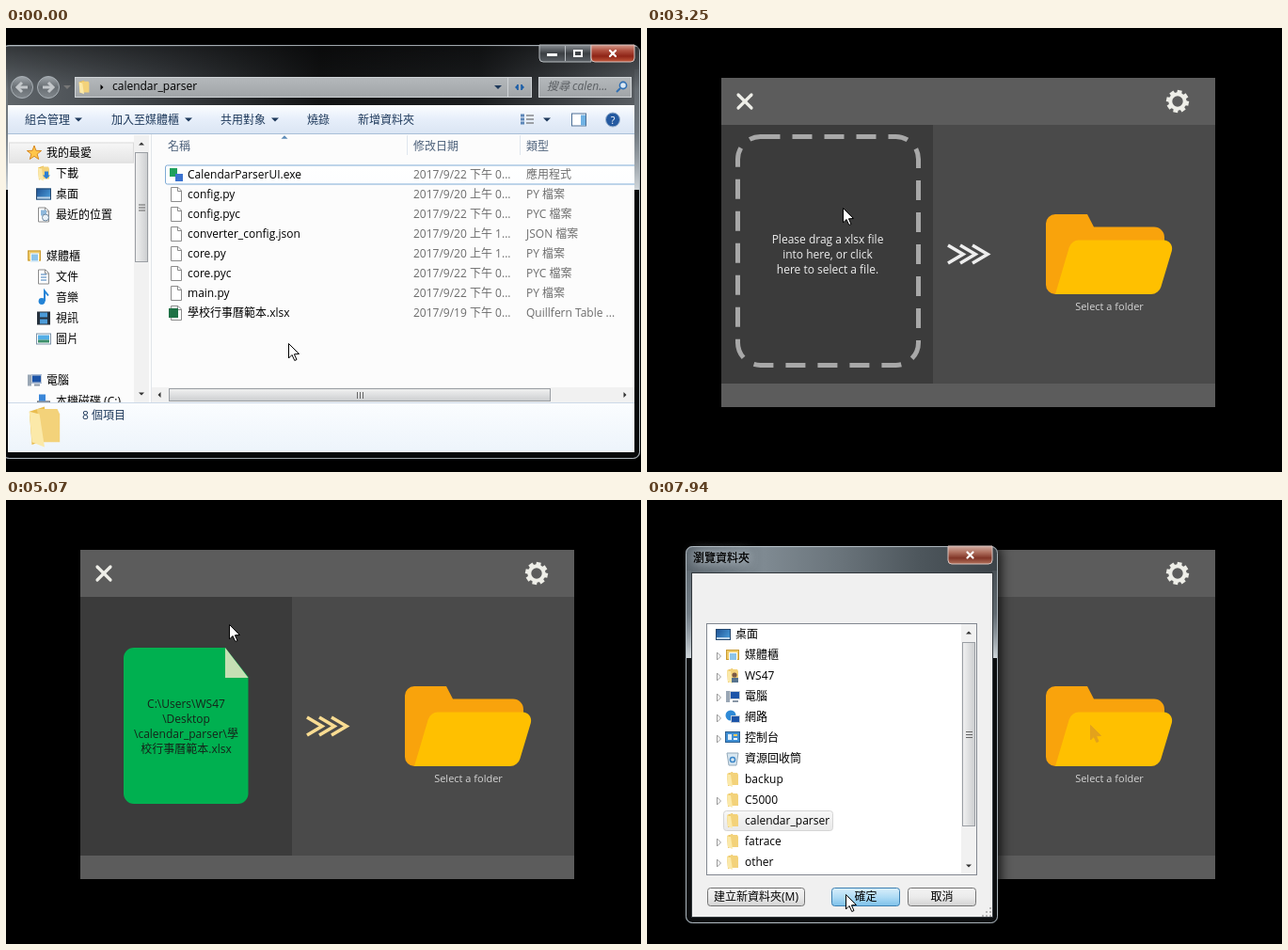
Write an HTML page with a canvas that moves like this. It is 675 px wide and 472 px high and loops after 8 s.

```html
<!DOCTYPE html>
<html lang="zh-Hant">
<head>
<meta charset="utf-8">
<style>
html, body { margin: 0; width: 100%; height: 100%; overflow: hidden; background: #000; }
canvas { display: block; }
</style>
</head>
<body>
<canvas id="stage" width="675" height="472"></canvas>
<script>
const W = 675, H = 472, LOOP = 8000;
const screen2d = document.getElementById('stage').getContext('2d');
const buffer = Object.assign(document.createElement('canvas'), { width: W, height: H }).getContext('2d');
let g = screen2d;

// ---- drawing helpers ----
function grad(x0, y0, x1, y1, ...colors) {
  const fill = g.createLinearGradient(x0, y0, x1, y1);
  colors.forEach((c, i) => fill.addColorStop(i / (colors.length - 1), c));
  return fill;
}
function paint(fill, line, width = 1) {
  if (fill) { g.fillStyle = fill; g.fill(); }
  if (line) { g.strokeStyle = line; g.lineWidth = width; g.stroke(); }
}
function box(x, y, w, h, fill, line) {
  if (fill) { g.fillStyle = fill; g.fillRect(x, y, w, h); }
  if (line) { g.strokeStyle = line; g.lineWidth = 1; g.strokeRect(x + .5, y + .5, w - 1, h - 1); }
}
function round(x, y, w, h, r, fill, line, width) {
  g.beginPath(); g.roundRect(x, y, w, h, r); paint(fill, line, width);
}
function circle(x, y, r, fill, line, width) {
  g.beginPath(); g.arc(x, y, r, 0, 7); paint(fill, line, width);
}
function poly(p, fill, line, width, open) {
  g.beginPath();
  for (let i = 0; i < p.length; i += 2) g.lineTo(p[i], p[i + 1]);
  if (!open) g.closePath();
  paint(fill, line, width);
}
const stroke = (p, color, width) => poly(p, null, color, width, true);
function text(s, x, y, color = '#000', { size = 12, align = 'left', style = '' } = {}) {
  g.font = `${style} ${size}px "Open Sans", "Noto Sans CJK TC", "Noto Sans CJK JP", sans-serif`;
  g.textAlign = align;
  g.fillStyle = color;
  g.fillText(s, x, y + 4.3);
}
function arrow(x, y, dx, dy, size = 4, color = '#333') {
  const k = size / 2;
  poly([x + dx * k, y + dy * k, x - dx * k + dy * size, y - dy * k + dx * size,
        x - dx * k - dy * size, y - dy * k - dx * size], color);
}
const down = (x, y, color = '#1e395b') => arrow(x, y, 0, 1, 4, color);
function cross(x, y, r, color, width) {
  g.lineCap = 'round';
  stroke([x - r, y - r, x + r, y + r], color, width);
  stroke([x + r, y - r, x - r, y + r], color, width);
  g.lineCap = 'butt';
}

// ---- icons, each on a 16 px grid ----
const sheetOfPaper = () => {
  poly([2.5, .5, 10, .5, 13.5, 4, 13.5, 15.5, 2.5, 15.5], '#fff', '#8c8c8c');
  stroke([9.5, .5, 9.5, 4.5, 13.5, 4.5], '#8c8c8c');
};
const icons = {
  folder() {
    poly([2, 2, 8, 0, 9, 13, 3, 15], '#e9bd4f');
    poly([5, 1, 13, 1, 14, 3, 14, 14, 7, 14], '#f3d27a');
    poly([2, 2, 6, 3, 8, 16, 3, 14], '#fbe9a9');
  },
  page: sheetOfPaper,
  sheet() { sheetOfPaper(); box(0, 3, 10, 10, '#1e7145'); },
  app() { box(1, 1, 8, 9, '#1fa15c'); box(7, 7, 8, 8, '#3b73d0'); },
  star() {
    const p = [];
    for (let i = 0; i < 10; i++) {
      const r = i % 2 ? 3.3 : 8, a = i * Math.PI / 5;
      p.push(8 + r * Math.sin(a), 8.5 - r * Math.cos(a));
    }
    poly(p, '#ffc64a', '#d98a22');
  },
  download() { icons.folder(); box(9, 6, 4, 5, '#2a7fd4'); arrow(11, 12, 0, 1, 4, '#2a7fd4'); },
  desktop() { box(0, 2, 16, 12, grad(0, 2, 16, 14, '#1d4f91', '#4da3e0'), '#25486f'); box(1, 11, 14, 2, '#bdd5ea'); },
  recent() { sheetOfPaper(); box(5, 3, 6, 6, '#8fb9dd'); circle(10, 11, 3.5, '#e8f1f8', '#6d87a0'); },
  library() { box(1, 2, 14, 11, '#f0cc6a', '#c99b34'); box(4, 5, 9, 9, '#8cc4ea', '#fff'); },
  document() { sheetOfPaper(); for (const y of [5, 8, 11]) box(5, y, 6, 1, '#3d7ab8'); },
  music() { circle(6, 12, 3.4, '#2383d6'); stroke([9, 12, 9, 1, 13, 6], '#2383d6', 2); },
  video() { box(1, 1, 14, 14, '#26313d'); box(4, 2, 8, 5, '#4c9bd8'); box(4, 9, 8, 5, '#4c9bd8'); },
  picture() { box(0, 2, 16, 12, '#fff', '#7c93a8'); box(2, 4, 12, 5, '#54aee6'); box(2, 9, 12, 3, '#3b8f6a'); },
  computer() { box(1, 2, 4, 12, '#9aa7b5'); box(5, 2, 11, 9, '#1c54a8', '#c4ccd6'); box(8, 12, 6, 2, '#8996a5'); },
  drive() { box(1, 8, 14, 6, '#a9b1ba', '#6d757e'); box(3, 1, 7, 7, '#3a86d8'); },
  user() { icons.folder(); circle(10, 7, 2.6, '#7b5a44'); box(7, 10, 7, 5, '#56738e'); },
  network() { circle(6, 6, 5.5, '#2f8ad6'); box(6, 6, 10, 8, '#1c54a8', '#c4ccd6'); },
  control() { box(0, 1, 16, 12, '#3f8fd4', '#2a5f92'); box(3, 4, 4, 6, '#dfeefa'); box(9, 4, 4, 2, '#f0c95c'); box(9, 8, 4, 2, '#fff'); },
  bin() { poly([2, 2, 14, 2, 12, 15, 4, 15], '#d8e7f1', '#93a9ba'); circle(8, 9, 2.6, null, '#3b86c8', 1.5); }
};
function icon(name, x, y, scale = 1) {
  g.save();
  g.translate(x, y); g.scale(scale, scale); g.translate(-8, -8);
  icons[name]();
  g.restore();
}

// ---- window parts ----
// tones run along the title bar; edge colours the frame below the reflection.
function glass(x, y, w, h, shine, tones, edge) {
  g.save();
  g.shadowColor = 'rgba(0,0,0,.8)'; g.shadowBlur = 12; g.shadowOffsetX = 3;
  round(x, y, w, h, 7, grad(x, 0, x + w, 0, ...tones));
  g.restore();
  const side = g.createLinearGradient(0, y, 0, y + h), stop = shine / h;
  side.addColorStop(0, 'rgba(160,172,182,0)');
  side.addColorStop(stop * .6, 'rgba(160,172,182,.35)');
  side.addColorStop(stop, '#d0d6da');
  side.addColorStop(stop, edge);
  side.addColorStop(1, edge);
  box(x + 1, y + 26, 5, h - 32, side);
  box(x + w - 6, y + 26, 5, h - 32, side);
  round(x + 1, y + h - 8, w - 2, 7, [0, 0, 6, 6], edge);
  round(x + .5, y + .5, w - 1, h - 1, 7, null, 'rgba(205,214,220,.75)');
}
function closeButton(x, y, w, h, ...tones) {
  round(x, y, w, h, [0, 0, 4, 4], grad(0, y, 0, y + h, ...tones), '#d8c4c0');
  cross(x + w / 2, y + h / 2, 3, '#fff', 2.2);
}
const dialogClose = (x, y) => closeButton(x, y, 47, 19, '#d0aca2', '#b27362', '#813527', '#b0705a');
function captionText(s, x, y) {
  g.save(); g.shadowColor = '#c8d2da'; g.shadowBlur = 12;
  text(s, x, y); text(s, x, y);
  g.restore();
}
function scrollBar(x, y, length, from, to, vertical) {
  const bar = (a, b, s, t, ...rest) => vertical ? box(x + b, y + a, t, s, ...rest) : box(x + a, y + b, s, t, ...rest);
  bar(0, 0, length, 16, '#f1f1f1');
  bar(from, 1, to - from, 14, vertical ? grad(x, 0, x + 16, 0, '#f5f5f5', '#c8cacc') : grad(0, y, 0, y + 16, '#f5f5f5', '#c8cacc'), '#9a9ea3');
  for (let i = -3; i <= 3; i += 3) bar((from + to) / 2 + i, 5, 1, 7, '#666');
  if (vertical) { arrow(x + 8, y + 9, 0, -1, 3); arrow(x + 8, y + length - 9, 0, 1, 3); }
  else { arrow(x + 8, y + 8, -1, 0, 3); arrow(x + length - 10, y + 8, 1, 0, 3); }
}
function button(x, y, w, h, label, look = 'plain') {
  const hot = look === 'hot';
  round(x + .5, y + .5, w - 1, h - 1, 3,
    grad(0, y, 0, y + h, ...(hot ? ['#dcf0fb', '#b0dcf5', '#7abfe9'] : ['#f4f4f4', '#ebebeb', '#d2d2d2'])),
    hot ? '#3c7fb1' : look === 'default' ? '#2f9cc9' : '#737373', look === 'default' ? 2 : 1);
  text(label, x + w / 2, y + h / 2, '#000', { align: 'center' });
}
function navBar(dx, dy, addressEnd, searchX, query, ...field) {
  g.save(); g.translate(dx, dy);
  for (const x of [17, 45]) {
    circle(x, 63, 11.5, grad(0, 51, 0, 75, '#a2a8ad', '#686e73', '#82888d'), '#a9b0b6');
    const d = x < 30 ? -1 : 1;
    stroke([x - 6 * d, 63, x + 5 * d, 63], '#c3c7ca', 3);
    stroke([x, 58, x + 5 * d, 63, x, 68], '#c3c7ca', 3);
  }
  down(65, 63, '#777');
  const fill = grad(0, 52, 0, 75, ...field), end = addressEnd - dx;
  box(73, 52, end - 73, 22, fill, '#d0d4d7');
  icon('folder', 83, 63, .9);
  arrow(102, 63, 1, 0, 3, '#000');
  text('calendar_parser', 113, 62);
  down(end - 36, 63);
  box(end - 26, 53, 1, 20, '#d0d4d7');
  const rx = end - 13;
  stroke([rx - 2, 66, rx - 2, 60], '#1d5fa8', 1.6); arrow(rx - 3.5, 63, -1, 0, 3, '#1d5fa8');
  stroke([rx + 2, 60, rx + 2, 66], '#1d5fa8', 1.6); arrow(rx + 3.5, 63, 1, 0, 3, '#1d5fa8');
  g.translate(-dx, 0);
  box(searchX, 52, 665 - searchX, 22, fill, '#d0d4d7');
  text(query, searchX + 9, 62, '#5a5e62', { style: 'italic' });
  circle(656, 61, 3.6, '#dce9f4', '#2f6fb3', 1.6); stroke([653, 64, 649, 68], '#2f6fb3', 2);
  g.restore();
}
function toolbar(x, y, w, h, items) {
  box(x, y, w, h, grad(0, y, 0, y + h, '#fbfdff', '#e6eefa', '#dae5f3'));
  box(x, y + h - 1, w, 1, '#a9bfd8');
  const mid = y + h / 2;
  for (const [label, at, more] of items) {
    text(label, at, mid, '#1e395b');
    if (more) down(more, mid);
  }
  for (let i = 0; i < 3; i++) {
    box(547, mid - 6 + i * 4, 4, 3, '#5c86b8');
    box(553, mid - 5 + i * 4, 8, 1, '#555');
  }
  down(575, mid);
  box(601, mid - 7, 16, 14, '#fff', '#4c6f96'); box(611, mid - 5, 5, 11, '#6fb2e4');
  circle(645, mid, 7.5, '#2459a0', '#9db4d0');
  text('?', 645, mid, '#fff', { size: 11, align: 'center' });
}
const places = [
  [0, 'star', '我的最愛'], [1, 'download', '下載'], [2, 'desktop', '桌面'], [3, 'recent', '最近的位置'],
  [5, 'library', '媒體櫃'], [6, 'document', '文件'], [7, 'music', '音樂'], [8, 'video', '視訊'], [9, 'picture', '圖片'],
  [11, 'computer', '電腦'], [12, 'drive', '本機磁碟 (C:)']
];
function sidebar(x, y, step) {
  box(x + 1, y - 11, 133, 22, grad(0, y - 11, 0, y + 11, '#f7f7f7', '#e4e4e4'), '#dcdcdc');
  for (const [row, name, label] of places) {
    const indent = row % 5 && row !== 11 ? 10 : 0;
    icon(name, x + 28 + indent, y + row * step);
    text(label, x + 41 + indent, y + row * step);
  }
}
function listHeader(y, name, date, type) {
  for (const [label, x] of [['名稱', name], ['修改日期', date], ['類型', type]]) {
    text(label, x, y, '#4c607a');
    if (x > name) box(x - 7, y - 12, 1, 21, '#dfe6ee');
  }
}
const files = [
  ['app', 'CalendarParserUI.exe', '22 下午 0', '應用程式'], ['page', 'config.py', '20 上午 0', 'PY 檔案'],
  ['page', 'config.pyc', '22 下午 0', 'PYC 檔案'], ['page', 'converter_config.json', '20 上午 1', 'JSON 檔案'],
  ['page', 'core.py', '20 上午 1', 'PY 檔案'], ['page', 'core.pyc', '22 下午 0', 'PYC 檔案'],
  ['page', 'main.py', '22 下午 0', 'PY 檔案'], ['sheet', '學校行事曆範本.xlsx', '19 下午 0', 'Quillfern Table ...']
];
function fileRow([kind, name, day, type], y, x, dateX, typeX) {
  icon(kind, x - 12, y);
  text(name, x, y);
  text(`2017/9/${day}...`, dateX, y, '#6d6d6d');
  text(type, typeX, y, '#6d6d6d');
}
function rowHighlight(x, y, w, look) {
  const [top, bottom, line] = {
    focus: ['#fff', '#fdfeff', '#7fabd6'], hover: ['#fafcff', '#ebf4fd', '#b8d6fb'],
    chosen: ['#e3effd', '#c8defb', '#7da2ce'], idle: ['#f8f8f8', '#e5e5e5', '#d9d9d9']
  }[look];
  round(x + .5, y - 10, w, 20, 2, grad(0, y - 10, 0, y + 10, top, bottom), line);
}

// ---- windows ----
function explorer(t) {
  glass(-4, 18, 678, 440, 154, ['#60666b', '#3a3e42', '#121314', '#1b1d1f', '#5a5f64'], '#08090a');
  box(-3, 20, 676, 45, grad(0, 20, 0, 65, 'rgba(0,0,0,.45)', 'rgba(0,0,0,0)'));
  round(567, 18, 55, 18, [0, 0, 0, 4], grad(0, 18, 0, 36, '#8a8f94', '#3b3f43', '#5a5f64'), '#b8bdc1');
  if (t > 1640) {
    g.save(); g.shadowColor = '#5cd8ff'; g.shadowBlur = 14;
    box(568, 19, 26, 16, grad(0, 19, 0, 35, '#a6d8ee', '#2d7fa8', '#6ed4f4'));
    g.restore();
  }
  box(594, 19, 1, 16, '#b8bdc1');
  box(575, 27, 11, 3, '#fff');
  g.strokeStyle = '#fff'; g.lineWidth = 2; g.strokeRect(604, 24, 8, 6);
  closeButton(622, 18, 46, 18, '#d49a8c', '#b0503f', '#8e2416', '#c2583c');
  navBar(0, 0, 559, 566, '搜尋 calen...', '#b5b9bc', '#9fa3a6');

  box(2, 82, 666, 369, '#fcfcfc');
  const ready = t >= 780;
  toolbar(2, 82, 666, 31, [['組合管理', 20, 77],
    ...(ready ? [['開啟', 132, 169], ['共用對象', 204, 262], ['燒錄', 296], ['新增資料夾', 350]]
      : [['加入至媒體櫃', 112, 194], ['共用對象', 228, 286], ['燒錄', 320], ['新增資料夾', 374]])]);
  if (ready) { box(113, 90, 14, 14, '#fff', '#34465c'); box(113, 90, 14, 3, '#34465c'); box(116, 96, 8, 5, '#5c86b8'); }

  g.save();
  g.beginPath(); g.rect(2, 113, 666, 286); g.clip();
  sidebar(2, 132.5, 22);
  scrollBar(136, 114, 284, 18, 135, true);
  box(154, 113, 1, 285, '#e2e6ea');
  listHeader(126, 172, 433, 553);
  arrow(296, 116, 0, -1, 3.5, '#5f8cb8');
  rowHighlight(169, 156, 520, t < 330 ? 'focus' : t < 610 ? 'hover' : t < 1100 ? 'chosen' : 'idle');
  files.forEach((file, i) => fileRow(file, 156 + 21 * i, 193, 433, 553));
  scrollBar(155, 382, 513, 18, 424, false);
  g.restore();

  box(2, 398, 666, 53, grad(0, 398, 0, 451, '#fbfdff', '#edf4fb'));
  box(2, 398, 666, 1, '#ccd9e8');
  if (t < 610) {
    icon('folder', 41, 424, 2.7);
    text('8 個項目', 81, 412, '#1e395b');
    return;
  }
  box(22, 405, 22, 27, '#1fa15c');
  box(41, 424, 22, 21, '#3b73d0');
  const label = '#5a6b85', value = '#1e395b';
  text('CalendarParserUI.exe', 79, 412, '#000', { size: 12.6 });
  text('應用程式', 79, 431, label);
  text('修改日期:', 214, 412, label); text('2017/9/22 下午 03:32', 270, 412, value);
  text('建立日期:', 407, 412, label); text('2017/9/22 下午 05:38', 463, 412, value);
  text('大小:', 238, 431, label); text('1.09 MB', 270, 431, value);
}

function openDialog(t) {
  const chosen = t >= 4620;
  glass(5, 0, 664, 468, 163, ['#35424e', '#4b5a68', '#7b8995', '#5d6b77', '#44515d'], '#2d3944');
  icon('app', 18, 13, .9);
  captionText('開啟舊檔', 32, 14);
  dialogClose(621, 0);
  navBar(7, -18, 461, 467, '搜尋 calendar_parser', '#b3bdc6', '#9ba6b0');
  box(11, 65, 652, 398, '#fff');
  toolbar(11, 65, 652, 29, [['組合管理', 28, 85], ['新增資料夾', 119]]);
  sidebar(10, 113, 21.7);
  scrollBar(149, 94, 292, 18, 157, true);
  box(167, 94, 1, 291, '#e2e6ea');
  listHeader(106, 185, 442, 560);
  arrow(306, 97, 0, -1, 3.5, '#5f8cb8');
  if (t >= 4350) rowHighlight(181, 136, 480, chosen ? 'chosen' : 'hover');
  fileRow(files[7], 136, 206, 441, 560);
  scrollBar(168, 369, 495, 19, 405, false);
  box(11, 386, 652, 77, '#f0f0f0');
  text('檔案名稱(N):', 207, 407, '#000', { align: 'right' });
  box(212, 396, 223, 22, '#fff', '#8fa5b8');
  if (chosen) text('學校行事曆範本.xlsx', 216, 407);
  else box(217, 400, 1, 14, '#000');
  down(426, 407, '#000');
  button(447, 396, 202, 22, '');
  text('Table file(*.xlsx)', 451, 407);
  down(640, 407, '#000');
  button(448, 425, 102, 25, '', 'default');
  text('開啟舊檔(O)', 491, 437, '#000', { align: 'center' });
  box(535, 427, 1, 21, '#8a8a8a');
  down(542, 438, '#000');
  button(563, 425, 84, 25, '取消');
}

const tree = [
  ['desktop', '桌面'], ['library', '媒體櫃', 1], ['user', 'WS47', 1], ['computer', '電腦', 1], ['network', '網路', 1],
  ['control', '控制台', 1], ['bin', '資源回收筒'], ['folder', 'backup'], ['folder', 'C5000', 1],
  ['folder', 'calendar_parser'], ['folder', 'fatrace', 1], ['folder', 'other', 1]
];
function browseDialog(t) {
  glass(41, 49, 332, 401, 119, ['#59636b', '#7f8a92', '#69737a', '#4d565c', '#3c4348'], '#0b0d0f');
  captionText('瀏覽資料夾', 49, 62);
  dialogClose(320, 49);
  box(47, 77, 321, 367, '#f0f0f0', '#30363b');
  box(63, 131, 288, 268, '#fff', '#828790');
  if (t >= 7600) round(81.5, 330.5, 116, 21, 3, grad(0, 330, 0, 352, '#f8f8f8', '#e8e8e8'), '#d5d5d5');
  tree.forEach(([kind, label, expands], i) => {
    const x = i ? 91 : 81, y = 143 + 22 * i;
    icon(kind, x, y);
    text(label, x + 13, y);
    if (expands && t >= 7400) {
      g.globalAlpha = Math.min(1, (t - 7390) / 200);
      poly([74.5, y - 3, 78.5, y + 1, 74.5, y + 5], '#fff', '#999');
      g.globalAlpha = 1;
    }
  });
  scrollBar(334, 132, 266, 19, 215, true);
  button(64, 412, 104, 20, '建立新資料夾(M)');
  button(196, 412, 73, 20, '確定', t >= 7860 ? 'hot' : 'default');
  button(277, 412, 73, 20, '取消');
  for (let i = 0; i < 3; i++) for (let j = 0; j <= i; j++) box(364 - 4 * j, 433 + 4 * i, 2, 2, '#b5b5b5');
}

function converter(hover, loaded) {
  box(79, 53, 525, 350, '#5c5c5c');
  box(79, 103, 525, 275, '#4a4a4a');
  if (hover === 'left') box(79, 103, 225, 275, '#3b3b3b');
  if (hover === 'right') box(304, 103, 300, 275, '#3b3b3b');
  cross(104, 78, 7, '#eeeee8', 3.2);
  for (let i = 0; i < 8; i++) {
    g.save(); g.translate(564, 78); g.rotate(i * Math.PI / 4 + .2);
    box(-2.5, -12, 5, 5, '#eeeee8');
    g.restore();
  }
  circle(564, 78, 7.7, null, '#eeeee8', 4);

  const centered = { align: 'center' };
  if (loaded) {
    g.beginPath();
    g.moveTo(233, 157); g.lineTo(257.5, 188);
    g.arcTo(257.5, 323, 125, 323, 11); g.arcTo(125, 323, 125, 157, 11);
    g.arcTo(125, 157, 233, 157, 11); g.closePath();
    paint('#00b050');
    poly([233, 157, 257.5, 189, 233, 189], '#c5e0b4');
    ['C:\\Users\\WS47', '\\Desktop', '\\calendar_parser\\學', '校行事曆範本.xlsx']
      .forEach((s, i) => text(s, 191.5, 217 + 16 * i, '#14241a', centered));
  } else {
    g.setLineDash([21, 13]);
    round(96.5, 115.5, 192, 243, 24, null, '#a8a8a8', 5);
    g.setLineDash([]);
    ['Please drag a xlsx file', 'into here, or click', 'here to select a file.']
      .forEach((s, i) => text(s, 192, 225 + 16 * i, '#eee', centered));
  }
  for (const x of [320, 333, 346]) stroke([x, 231, x + 16, 240.5, x, 250], loaded ? '#f9dc92' : '#eee', 3.6);

  g.beginPath();
  g.moveTo(434, 198); g.lineTo(468, 198); g.lineTo(475, 211.5);
  g.arcTo(550, 211.5, 550, 240, 11); g.lineTo(550, 260); g.lineTo(440, 283);
  g.arcTo(424, 283, 424, 260, 10); g.arcTo(424, 198, 440, 198, 10);
  paint('#f9a30c');
  g.beginPath();
  g.moveTo(500, 225.5); g.arcTo(561, 225.5, 545, 283, 9); g.arcTo(544, 283, 500, 283, 11);
  g.lineTo(434, 283); g.arcTo(451, 225.5, 500, 225.5, 11);
  paint('#ffc000');
  text('Select a folder', 491.5, 296, '#d4d4d4', { size: 11, align: 'center' });
}

function pointer(x, y, fill = '#fff', line = '#000') {
  g.save(); g.translate(x, y);
  poly([.5, .5, .5, 16, 4, 12.5, 6.8, 18.5, 9, 17.5, 6.4, 11.8, 11.5, 11.5], fill, line);
  g.restore();
}

// ---- motion: [time, x, y] ----
const pointerPath = [
  [70, 300, 335], [460, 240, 156], [1020, 240, 156], [1700, 588, 22], [3050, 250, 78], [3170, 208, 191],
  [3250, 208, 191], [3480, 201, 184], [3710, 201, 184], [3960, 177, 193], [4420, 237, 132], [5070, 237, 132],
  [5520, 471, 239], [5800, 471, 239], [6440, 90, 41], [6800, 90, 41], [7150, 274, 64], [7320, 290, 190],
  [7400, 290, 190], [7600, 160, 342], [7740, 160, 342], [7900, 211, 419]
];
const converterPath = [[2410, -433, -75], [2680, -90, 10], [2850, 68, 28], [3050, 0, 0]];
const browsePath = [[6800, -184, -23], [7150, 0, 0]];
const clamp = v => Math.max(0, Math.min(1, v));

function track(path, t) {
  const i = path.findIndex(key => key[0] > t);
  if (i < 1) return (i ? path[path.length - 1] : path[0]).slice(1);
  const [t0, x0, y0] = path[i - 1], [t1, x1, y1] = path[i];
  let p = (t - t0) / (t1 - t0);
  p = p * p * (3 - 2 * p);
  return [x0 + (x1 - x0) * p, y0 + (y1 - y0) * p];
}
// Draws a whole window at one opacity, scaled about (cx, cy).
function layer(alpha, scale, cx, cy, draw) {
  if (alpha <= 0) return;
  g = buffer;
  g.setTransform(1, 0, 0, 1, 0, 0);
  g.clearRect(0, 0, W, H);
  g.setTransform(scale, 0, 0, scale, cx * (1 - scale), cy * (1 - scale));
  draw();
  g = screen2d;
  g.globalAlpha = alpha;
  g.drawImage(buffer.canvas, 0, 0);
  g.globalAlpha = 1;
}

function render(t) {
  box(0, 0, W, H, '#000');
  let [x, y] = track(pointerPath, t);
  if (t < 2050) {
    const gone = clamp((t - 1790) / 250);
    layer(1 - gone, 1 - .35 * gone, 337, 472, () => explorer(t));
  }
  if (t >= 2410) {
    const [ox, oy] = track(converterPath, t);
    if (t < 3050) { x = 250 + ox; y = 78 + oy; }
    const covered = t >= 3710 && t < 4980 || t >= 5720;
    const inside = !covered && x > 79 && x < 604 && y > 103 && y < 378;
    g.save(); g.translate(ox, oy);
    converter(inside && t > 3050 && (x < 304 ? 'left' : 'right'), t >= 4980);
    g.restore();
    if (t > 5820) pointer(471, 239, '#e3a21c', '#e3a21c');

    const opened = t < 4900 ? clamp((t - 3710) / 285) : 1 - clamp((t - 4900) / 150);
    layer(opened, 1.015 * (.88 + .12 * opened), 337, 234, () => openDialog(t));

    const browsing = clamp((t - 5720) / 260), [bx, by] = track(browsePath, t);
    layer(browsing, .88 + .12 * browsing, 23, 226, () => { g.translate(bx, by); browseDialog(t); });
  }
  if (t < 1950 || t >= 2410) pointer(x, y);
}

const start = performance.now();
(function tick() {
  render((performance.now() - start) % LOOP);
  requestAnimationFrame(tick);
})();
</script>
</body>
</html>
```
